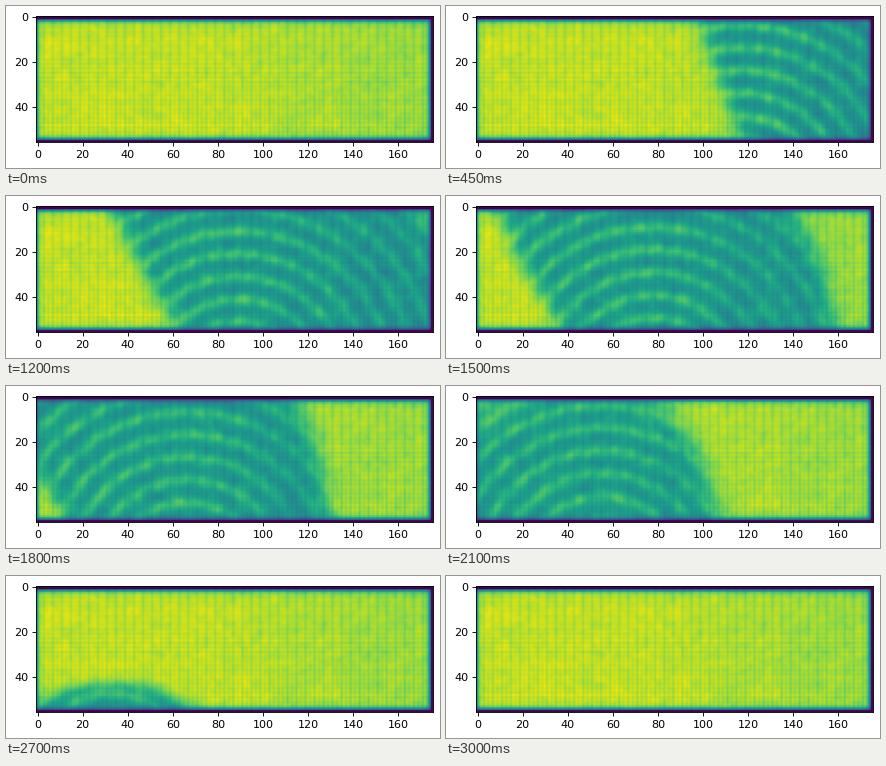
Recreate the animation shown at these times as a matplotlib script. Size 434 by 162 pixels, loop 3150 ms.

```python
import numpy as np
import matplotlib.pyplot as plt
from matplotlib.animation import FuncAnimation

W, H, DPI = 434, 162, 80
COLS, ROWS = 176, 56
FRAMES, STEP = 21, 150

plt.rcParams.update({"font.family": "DejaVu Sans", "font.size": 10})
x, y = np.meshgrid(np.arange(COLS), np.arange(ROWS))
rng = np.random.default_rng(4)


def sigmoid(v):
    return 1 / (1 + np.exp(-np.clip(v, -40, 40)))


def blur(a, n):
    """Smooth noise by repeated averaging with its neighbours."""
    for _ in range(n):
        for axis in (0, 1):
            a = (np.roll(a, 1, axis) + 2 * a + np.roll(a, -1, axis)) / 4
    return a / a.std()


def border(n, before, after):
    """Dead cells at both ends of an axis, then a quick rise to one."""
    k = np.arange(n)
    gap = np.minimum(k - before, n - 1 - after - k)
    return np.where(gap < 0, 0, 1 - 0.42 * np.exp(-gap / 0.8))


# Fixed grid texture: column stripes, fine rows and a little grain
depth = y / ROWS
stripes = (0.026 * (1.2 - 0.7 * depth) * np.cos(np.pi * (x - 1) / 2)
           + 0.020 * (0.4 + depth) * np.cos(np.pi * x))
lines = 0.010 * np.cos(np.pi * y) + 0.008 * rng.standard_normal((ROWS, 1))
grain = 0.010 * blur(rng.standard_normal((ROWS, COLS)), 1)
texture = stripes + lines + grain
clouds = blur(rng.standard_normal((ROWS, COLS)), 4)

calm = 0.905 - 0.065 * sigmoid((x - 115) / 18) + 0.010 * clouds
fade = np.outer(border(ROWS, 2, 1), border(COLS, 0, 1))


def field(i):
    cx = 134 - 5.6 * i
    u = 16 - i

    # Slanted front that sweeps to the left
    front = 133 - 12.4 * i + 60 * np.exp(-i)
    left = front + min(5 * i, 22) * (y / 44) ** 1.2

    # Dome that shrinks behind it; its left half closes last
    a = 44 + 2.2 * u + 0.65 * u * u
    b = np.clip(47 + 12 * u, 1, 100)
    close = np.where(x < cx, np.clip((i - 12) / 4, 0, 1), 1)
    dome = (1 - np.hypot((x - cx) * close / a, (y - 66) / b)) * a
    mask = sigmoid((x - left) / 2.2) * sigmoid(dome / 2.8)

    # Concentric ripples inside the disturbed part
    crest = 14.5 - 0.053 * i * i
    dist = np.hypot(x - cx, y - 80)
    wave = 0.5 + 0.5 * np.cos(2 * np.pi * (80 - crest - dist) / 10)
    beads = 1 + 0.2 * np.sin(x * 2 * np.pi / 9 + y / 6)
    side = sigmoid((x - cx - 32) / 10)
    rings = (0.19 - 0.004 * i - 0.07 * side) * wave ** 1.4 * beads
    rough = 0.505 + 0.002 * i - 0.03 * side + rings + 0.018 * clouds

    value = calm * (1 - mask) + rough * mask + texture * (1 - 0.35 * mask)
    return np.clip(value * fade, 0, 1)


fig = plt.figure(figsize=(W / DPI, H / DPI), dpi=DPI, facecolor="white")
LEFT, TOP, WIDE = 30.4, 9.9, 396.8
TALL = WIDE * ROWS / COLS
ax = fig.add_axes([LEFT / W, 1 - (TOP + TALL) / H, WIDE / W, TALL / H])
image = ax.imshow(field(0), cmap="viridis", vmin=0, vmax=1)
ax.set_xticks(range(0, COLS, 20))
ax.set_yticks(range(0, ROWS, 20))


def update(i):
    image.set_data(field(i))
    return [image]


anim = FuncAnimation(fig, update, frames=FRAMES, interval=STEP,
                     repeat=True, repeat_delay=0)
plt.show()
```
